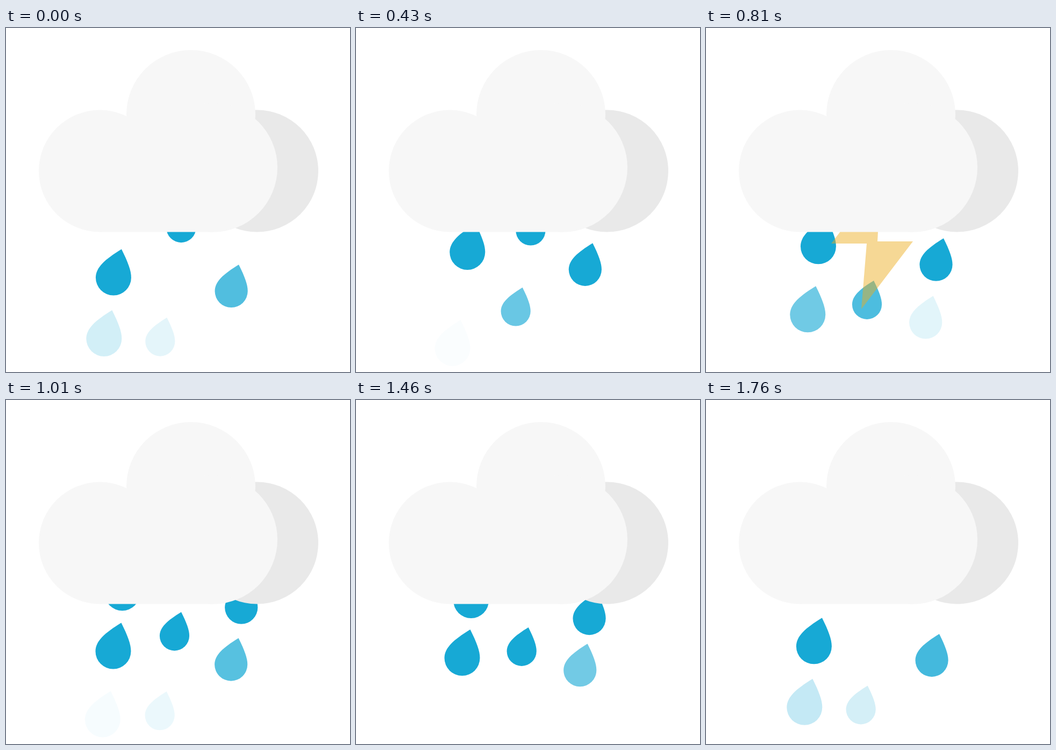
Recreate the animation shown at these times as an HTML page. Size 640 px wide and 640 px high, loop 1.78 s.

```html
<!DOCTYPE html>
<html lang="en">
<head>
<meta charset="utf-8">
<title>Thunderstorm</title>
<style>
  html, body { margin: 0; height: 100%; overflow: hidden; background: #fff; }
  svg { display: block; width: 100%; height: 100%; }
</style>
</head>
<body>
<svg viewBox="0 0 640 640">
  <defs>
    <!-- the tip of the drop is the origin -->
    <path id="drop" d="M0 0C12 24 18 40 18 53A33 33 0 0 1-48 53C-48 34-31 19 0 0z"/>
  </defs>
  <g id="rain" fill="#17a9d5"></g>
  <path id="bolt" fill="#ebaa1b" d="M265 359L233 401H299L289 523L385 397H319L321 359z"/>
  <rect x="353" y="152.5" width="228" height="227" rx="113.5" fill="#e9e9e9"/>
  <g fill="#f7f7f7">
    <circle cx="174.5" cy="266" r="113.5"/>
    <circle cx="344" cy="161" r="120"/>
    <circle cx="385" cy="259.7" r="120"/>
    <rect x="174.5" y="230" width="210.5" height="149.5"/>
  </g>
</svg>
<script>
const LOOP = 1780;
const bursts = [-8, 407, 816, 1187];

// Left drops ease in, the others fall at constant speed.
const easedFall = age => 353 + 0.306 * (age - 403) + 3.85e-4 * Math.max(0, 403 - age) ** 2;

// x: tip at y = 400, lean: sideways drift per pixel fallen
const columns = [
  { x: 216.7, lean: -0.155, scale: 1, fadeFrom: 440, fadeTo: 545, fall: easedFall },
  { x: 325, lean: -0.185, scale: 0.836, fadeFrom: 445, fadeTo: 551, fall: age => 324 + 0.3615 * age },
  { x: 440.3, lean: -0.18, scale: 0.927, fadeFrom: 417, fadeTo: 510, fall: age => 286.5 + 0.259 * age }
];

const flashes = [
  { at: 170, peak: 0.557 },
  { at: 810, peak: 0.465 }
];
const FLASH_FADE = 150;

const rain = document.getElementById('rain');
const bolt = document.getElementById('bolt');
const clamp = v => Math.min(1, Math.max(0, v));

const drops = columns.flatMap(column => bursts.map(start => {
  const el = document.createElementNS('http://www.w3.org/2000/svg', 'use');
  el.setAttribute('href', '#drop');
  rain.append(el);
  return { el, column, start };
}));

function draw(t) {
  // the rain surges slightly at the start of the loop
  const rainTime = t < 430 ? t + 9 * Math.sin(Math.PI * t / 430) : t;

  for (const { el, column: c, start } of drops) {
    const age = (rainTime - start + LOOP) % LOOP;
    const y = c.fall(age);
    const x = c.x + c.lean * (y - 400);
    el.setAttribute('transform', `translate(${x} ${y}) scale(${c.scale})`);
    el.setAttribute('opacity', clamp((c.fadeTo - y) / (c.fadeTo - c.fadeFrom)));
  }

  const glow = flashes.map(f => f.peak * clamp(1 - Math.abs(t - f.at) / FLASH_FADE));
  bolt.setAttribute('opacity', Math.max(...glow));
}

const begin = performance.now();
function tick() {
  draw((performance.now() - begin) % LOOP);
  requestAnimationFrame(tick);
}
tick();
</script>
</body>
</html>
```
